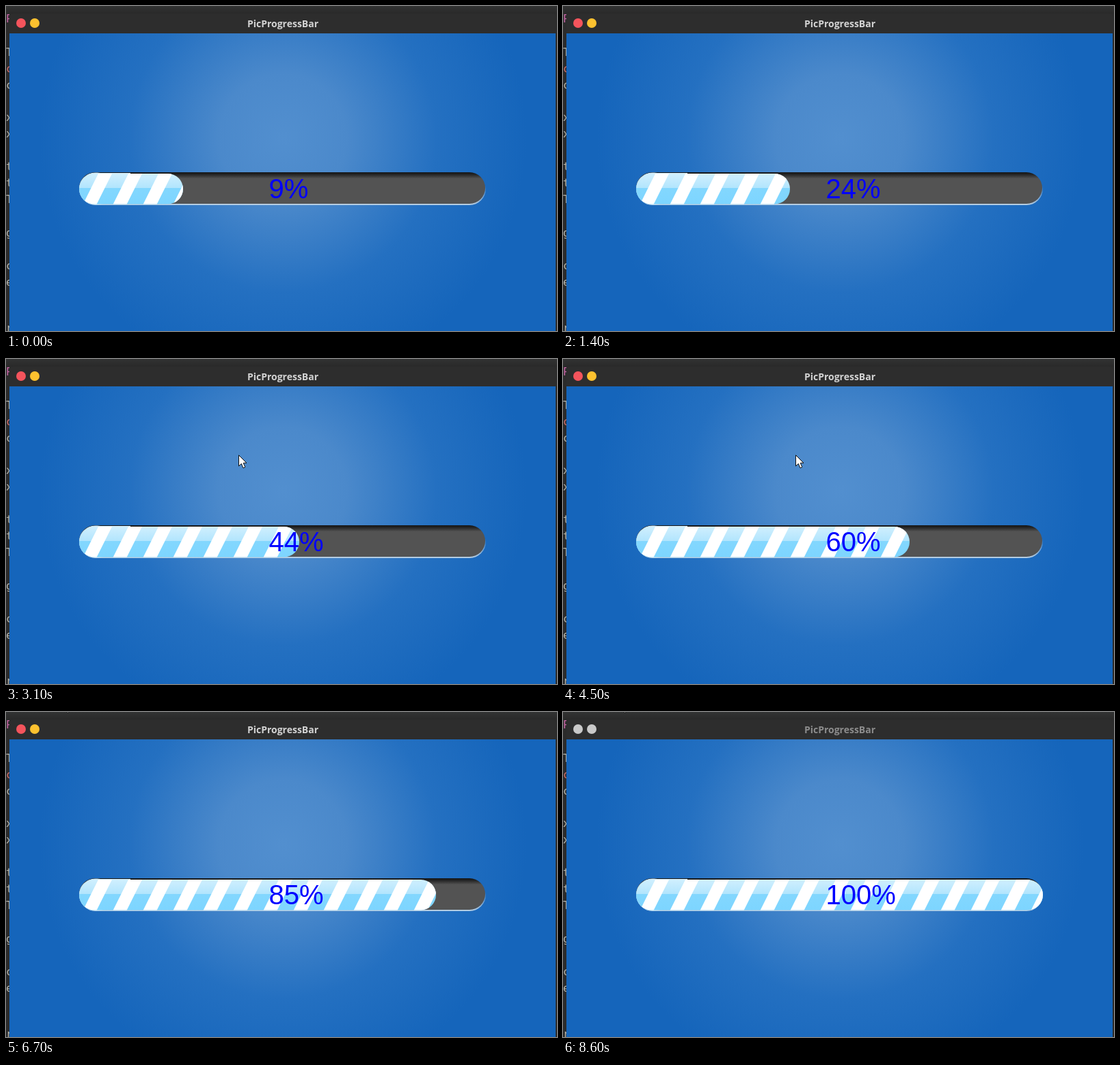
An HTML page for the animation above (8.8 s loop, 806 px wide and 475 px high).

```html
<!DOCTYPE html>
<html lang="en">
<head>
<meta charset="utf-8">
<title>PicProgressBar</title>
<style>
  html, body { margin: 0; width: 100%; height: 100%; overflow: hidden; background: #2d2d2d; }
  svg { display: block; }
  .title { font: bold 14px "Open Sans", sans-serif; fill: #d3d3d3; }
  .code { font: 16px "DejaVu Sans Mono", monospace; fill: #b4b4ac; }
  .percent { font: 40px "Liberation Sans", Arial, sans-serif; fill: #00f; }
  .close { fill: #f4545c; }
  .minimise { fill: #fcc12f; }
  .inactive .title { fill: #8c8c8c; }
  .inactive .button { fill: #c9c9c9; }
</style>
</head>
<body>
<svg id="stage" width="806" height="475" viewBox="0 0 806 475">
  <defs>
    <linearGradient id="top" x2="0" y2="1">
      <stop stop-color="#323333"/><stop offset="1" stop-color="#292929"/>
    </linearGradient>
    <radialGradient id="glow" gradientUnits="userSpaceOnUse" cx="405" cy="193" r="375">
      <stop stop-color="#528fcf"/>
      <stop offset=".25" stop-color="#4b89cb"/>
      <stop offset=".6" stop-color="#2470c1"/>
      <stop offset=".95" stop-color="#1565bb"/>
    </radialGradient>
    <linearGradient id="groove" x2="0" y2="1">
      <stop stop-color="#151515"/>
      <stop offset=".06" stop-color="#222"/>
      <stop offset=".2" stop-color="#535353"/>
    </linearGradient>
    <linearGradient id="rim" x2="0" y2="1">
      <stop offset=".4" stop-color="#b9cfe2" stop-opacity="0"/>
      <stop offset="1" stop-color="#b9cfe2"/>
    </linearGradient>
    <linearGradient id="gloss" x2="0" y2="1">
      <stop stop-color="#d0effe"/>
      <stop offset=".46" stop-color="#b2e5fd"/>
      <stop offset=".46" stop-color="#83d7fe"/>
      <stop offset="1" stop-color="#7dd5ff"/>
    </linearGradient>
    <clipPath id="strip"><rect width="5" height="475"/></clipPath>
    <clipPath id="filled"><rect id="fill" x="107" y="245" height="44.5" rx="22.25"/></clipPath>
  </defs>

  <rect width="806" height="475" fill="#2b2b2b"/>
  <rect width="806" height="11" fill="url(#top)"/>
  <g id="editor" class="code" clip-path="url(#strip)"></g>
  <path d="M5 40V16q0-5 5-5H799q5 0 5 5V40Z" fill="#2d2d2d"/>
  <circle class="button close" cx="22" cy="25" r="7"/>
  <circle class="button minimise" cx="42" cy="25" r="7"/>
  <text class="title" x="405" y="31" text-anchor="middle">PicProgressBar</text>
  <rect x="5" y="40" width="799" height="435" fill="url(#glow)"/>

  <rect x="107" y="243" width="595" height="48" rx="24" fill="url(#rim)"/>
  <rect x="107" y="243" width="594" height="46" rx="23" fill="url(#groove)"/>
  <rect x="107" y="243.5" width="50" height="47" rx="23.5" fill="#c5e3f5"/>
  <path d="M125 244.5H182" stroke="#d6effb"/>
  <g clip-path="url(#filled)">
    <rect x="107" y="245" width="595" height="45" fill="url(#gloss)"/>
    <path id="stripes" fill="#fff"/>
  </g>
  <text id="percent" class="percent" x="384.5" y="281"></text>
  <path id="cursor" d="M.5.5V16.5L4.3 13 7 19.3 9.8 18 7.2 12H12Z" fill="#fff" stroke="#111"/>
</svg>
<script>
const $ = id => document.getElementById(id);

// Clipped code lines: glyph, baseline, optional colour
const glyphs = [
  ["P", 24, "#c565a5"], ["T", 73], ["c", 97, "#d0706c"], ["c", 121], ["x", 168], ["x", 192],
  ["t", 240], ["t", 264], ["T", 288], ["g", 337], ["c", 385], ["e", 409], ["r", 476]
];
$("editor").innerHTML = glyphs.map(([glyph, y, colour]) =>
  `<text x="0" y="${y}"${colour ? ` style="fill:${colour}"` : ""}>${glyph}</text>`).join("");

$("stripes").setAttribute("d", Array.from({ length: 14 }, (_, i) =>
  `M${112.5 + i * 44} 290l22.5-45h20l-22.5 45z`).join(""));

// Pointer route: step, x, y
const route = [
  [18, 33, 371], [27, 340, 153], [30, 340, 140], [46, 340, 140],
  [54, 37, 17], [57, 80, -7], [63, 83, -11], [66, 83, -18], [88, 83, -18]
];

function pointerAt(step) {
  const next = route.findIndex(point => point[0] > step);
  const [s0, x0, y0] = route[next - 1], [s1, x1, y1] = route[next];
  const k = (step - s0) / (s1 - s0);
  return [Math.round(x0 + (x1 - x0) * k), Math.round(y0 + (y1 - y0) * k)];
}

function draw(now) {
  const step = Math.floor(now % 8800 / 100);
  const value = Math.floor(9 + 91 * Math.min(step / 80, 1));
  $("percent").textContent = value + "%";
  $("fill").setAttribute("width", Math.floor(108.55 + 4.867 * value));
  $("stage").classList.toggle("inactive", step >= 86);

  const visible = step >= route[0][0];
  $("cursor").style.display = visible ? "" : "none";
  if (visible) $("cursor").setAttribute("transform", `translate(${pointerAt(step)})`);
  requestAnimationFrame(draw);
}
draw(performance.now());
</script>
</body>
</html>
```
